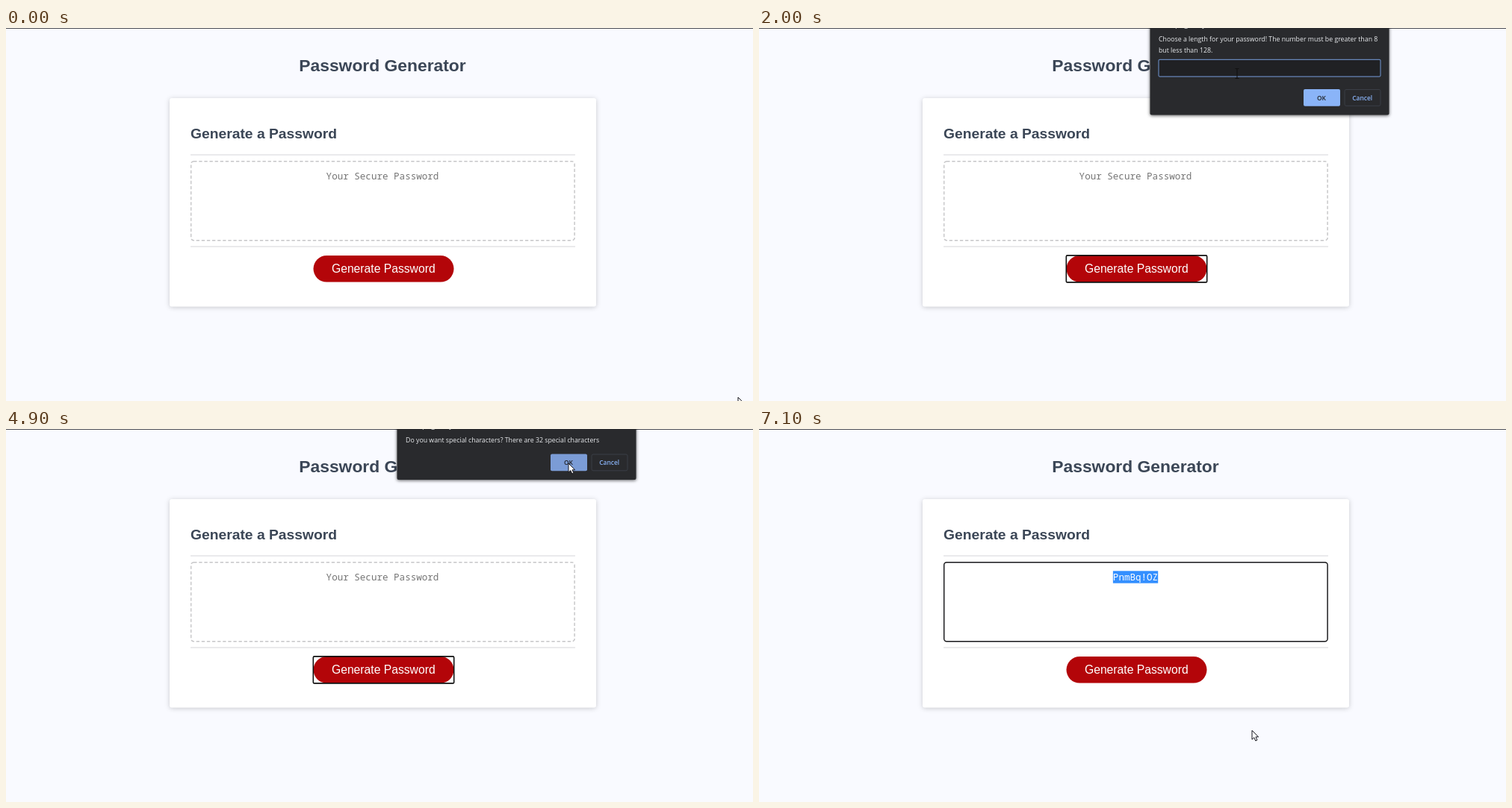
An HTML page that plays this animation: 1000x500 px, repeating every 7200 ms.

```html
<!DOCTYPE html>
<html lang="en">
<head>
<meta charset="utf-8">
<title>Password Generator</title>
<style>
  html, body { margin: 0; width: 100%; height: 100%; overflow: hidden; background: #f9faff; }
  svg { display: block; width: 100vw; height: 100vh; }
  .page { font-family: "Liberation Sans", Arial, sans-serif; text-anchor: middle; }
  .head { font-weight: 700; fill: #3b4656; }
  .mono { font: 12.57px "Noto Sans Mono", "DejaVu Sans Mono", monospace; text-anchor: middle; white-space: pre; }
  .dialog { font: 8.78px "Open Sans", "Noto Sans", sans-serif; fill: #e8eaed; }
  .card { filter: drop-shadow(0 1.5px 3px rgba(0, 0, 0, .2)); }
  .panel { filter: drop-shadow(0 1px 2px rgba(0, 0, 0, .65)); }
  .label { font-size: 8.4px; font-weight: 600; text-anchor: middle; }
</style>
</head>
<body>
<svg viewBox="0 0 1000 500" preserveAspectRatio="none">
  <defs>
    <path id="arrow" d="M0 0V12.2L2.8 9.6L4.8 14L6.9 13L5 8.8H8.6Z" fill="#fff" stroke="#15151c" stroke-linejoin="round"/>
    <path id="hand" d="M-1.5 9V1Q-1.5-1 0-1T1.5 1V5.2Q3-.2 4.3 5.6Q6-.2 7 6.2Q9 4.3 9.1 7.2V10Q9 13 7.2 15.5H.5Q-1-1-1 0L.5 15.5L-5 8.8Q-4.8 5.8-1.5 9Z" fill="#fff" stroke="#111" stroke-width="1.1" stroke-linejoin="round"/>
    <path id="beam" d="M-2.5-6.5H-.8L0-5.8L.8-6.5H2.5M0-5.8V5.8M-2.5 6.5H-.8L0 5.8L.8 6.5H2.5" fill="none" stroke="#111" stroke-width="1.1"/>
  </defs>

  <rect width="1000" height="500" fill="#f9faff"/>
  <rect width="1000" height="1" fill="#4b4c52"/>

  <g class="page">
    <text class="head" x="504" y="58" font-size="22.85">Password Generator</text>
    <rect class="card" x="219" y="94" width="571" height="279.5" rx="3" fill="#fff"/>
    <text class="head" x="345" y="148" font-size="19.28">Generate a Password</text>
    <path d="M247 170H762M247 293H762" stroke="#e4e4e6" stroke-width="1.5"/>
    <rect id="area" x="247.7" y="178.7" width="513.4" height="106" rx="3.5" fill="#fff" stroke-width="1.45"/>
    <rect x="411.5" y="305" width="188" height="35.6" rx="17.8" fill="#b30509"/>
    <rect id="focus" x="411.3" y="304.9" width="188.4" height="36" rx="1.5" fill="none" stroke="#111" stroke-width="1.6"/>
    <text x="505.3" y="328" font-size="15.7" fill="#fff">Generate Password</text>
  </g>
  <text id="hint" class="mono" x="504" y="203" fill="#757575">Your Secure Password</text>
  <rect id="mark" y="190.3" height="16.4" fill="#338fff"/>
  <text id="result" class="mono" x="504" y="203" fill="#222"><tspan id="plain"></tspan><tspan id="picked" fill="#fff"></tspan></text>

  <g id="dialog" class="dialog">
    <rect id="panel" class="panel" x="523.5" y="-20" width="320" rx="2" fill="#292a2d"/>
    <text x="535" y="-2.2" font-size="10.2">This page says</text>
    <text id="line1" x="535" y="18.3"></text>
    <text id="line2" x="535" y="32.6"></text>
    <g id="field">
      <rect x="535" y="42.3" width="297" height="22.8" rx="1.5" fill="#202124" stroke="#6685b8" stroke-width="1.2"/>
      <text id="typed" x="540.5" y="57"></text>
      <rect id="caret" y="47.5" width="1" height="11.5"/>
    </g>
    <g id="buttons">
      <rect id="ok" x="729" y="-34.5" width="49" height="22.8" rx="2"/>
      <text class="label" x="753" y="-20" fill="#202124">OK</text>
      <rect x="784" y="-34" width="48" height="21.8" rx="2" fill="none" stroke="#3a3e46"/>
      <text class="label" x="807.7" y="-20" fill="#8ab4f8">Cancel</text>
    </g>
  </g>
  <use id="pointer"/>
</svg>

<script>
const LOOP = 7200, STEP = 100;
const PASSWORD = "PnmBq!OZ", CHAR = 7.54, TEXT_LEFT = 473.8, TEXT_RIGHT = 534.2;
const TIME = { focus: 500, typed: 2100, done: 5000, select: 6200, release: 6500 };

const dialogs = [
  { at: 600, bottom: 116.5, field: true,
    lines: ["Choose a length for your password! The number must be greater than 8", "but less than 128."] },
  { at: 2600, bottom: 82, lines: ["Do you want upper case characters? There are 26 upper case characters."] },
  { at: 3300, bottom: 68, lines: ["Do you want lower case characters? There are 26 lower case characters."] },
  { at: 4100, bottom: 68, lines: ["Do you want numbers? There are 10 numbers"] },
  { at: 4600, bottom: 68, lines: ["Do you want special characters? There are 32 special characters"] }
];

// Pointer stops: time, x, y
const path = [
  [0, 980, 495], [500, 551, 332], [900, 551, 332], [1600, 640, 61], [2100, 640, 61],
  [2500, 752, 92], [2600, 752, 92], [3000, 748, 65], [3300, 748, 65], [3700, 753, 46],
  [5000, 753, 46], [5700, 687.5, 262], [5800, 687.5, 262], [6200, 535, 199],
  [6500, 472, 199], [6900, 666, 415], [7100, 660, 404], [7200, 660, 404]
];

const el = {};
document.querySelectorAll("svg [id]").forEach(node => el[node.id] = node);
const set = (node, attrs) => { for (const key in attrs) node.setAttribute(key, attrs[key]); };
const show = (node, on) => set(node, { visibility: on ? "inherit" : "hidden" });
const inside = ([x, y], left, top, right, bottom) => x >= left && x <= right && y >= top && y <= bottom;
const ease = p => p * p * (3 - 2 * p);

function pointerAt(t) {
  const i = Math.max(1, path.findIndex(stop => stop[0] >= t));
  const [t0, x0, y0] = path[i - 1], [t1, x1, y1] = path[i];
  const p = ease((t - t0) / (t1 - t0));
  return [x0 + (x1 - x0) * p, y0 + (y1 - y0) * p];
}

function pointerKind(pos, dialog) {
  if (dialog && inside(pos, 523, 0, 844, dialog.bottom))
    return dialog.field && inside(pos, 535, 42, 832, 65) ? "beam" : "arrow";
  if (inside(pos, 411, 305, 600, 341)) return "hand";
  return !dialog && inside(pos, 247, 178, 761, 285) ? "beam" : "arrow";
}

function drawDialog(dialog, t, pos) {
  show(el.dialog, dialog);
  if (!dialog) return;
  const { bottom, lines, field } = dialog;
  set(el.panel, { height: bottom + 20 });
  el.line1.textContent = lines[0];
  el.line2.textContent = lines[1] || "";
  set(el.buttons, { transform: `translate(0 ${bottom})` });
  const hover = inside(pos, 729, bottom - 34.5, 778, bottom - 12);
  set(el.ok, { fill: hover ? "#7b9cd6" : "#8ab4f8" });
  show(el.field, field);
  const typed = t >= TIME.typed;
  el.typed.textContent = field && typed ? "8" : "";
  set(el.caret, { x: typed ? 546 : 540.5 });
  show(el.caret, field && (t - 600) % 900 < 450);
  if (!field) show(el.caret, false);
}

function drawResult(t, pos) {
  const done = t >= TIME.done, selecting = t >= TIME.select;
  show(el.hint, !done);
  show(el.result, done);
  const edge = t >= TIME.release ? TEXT_LEFT : pos[0];
  const count = selecting
    ? Math.min(PASSWORD.length, Math.max(0, Math.round((TEXT_RIGHT - edge) / CHAR))) : 0;
  const cut = PASSWORD.length - count;
  el.plain.textContent = PASSWORD.slice(0, cut);
  el.picked.textContent = PASSWORD.slice(cut);
  set(el.mark, { x: TEXT_RIGHT - count * CHAR, width: count * CHAR });
  set(el.area, { stroke: selecting ? "#17171a" : "#c6c6c8", "stroke-dasharray": selecting ? "none" : "4.3 2.8" });
  show(el.focus, t >= TIME.focus && !selecting);
}

function render(t) {
  const pos = pointerAt(t);
  const dialog = t < TIME.done ? dialogs.filter(d => d.at <= t).pop() : null;
  drawDialog(dialog, t, pos);
  drawResult(t, pos);
  set(el.pointer, { href: "#" + pointerKind(pos, dialog), x: pos[0], y: pos[1] });
}

const start = performance.now();
function tick() {
  const elapsed = (performance.now() - start) % LOOP;
  render(Math.floor(elapsed / STEP) * STEP);
  requestAnimationFrame(tick);
}
tick();
</script>
</body>
</html>
```
